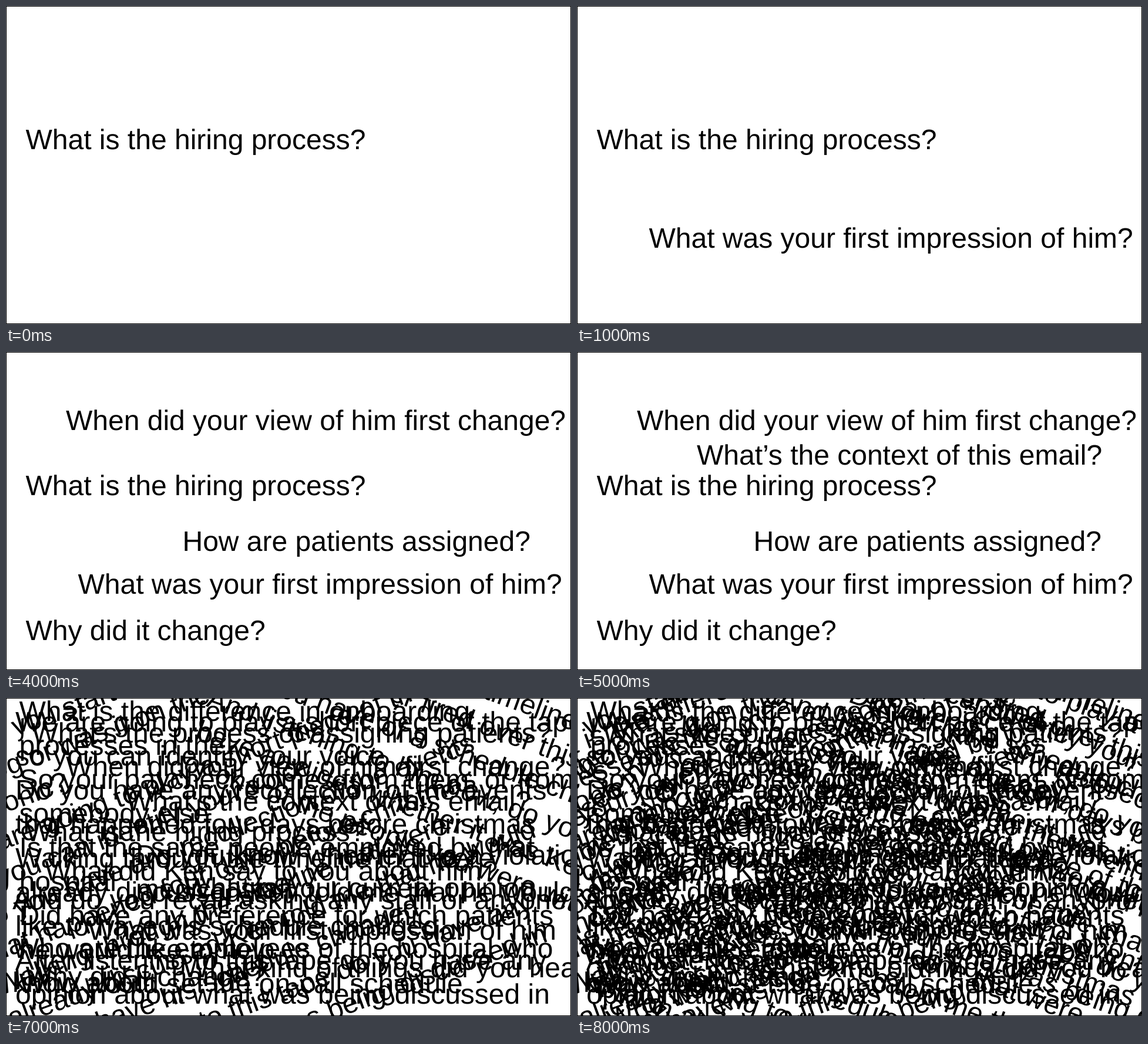
These frames come from a looping animation (962 by 542 pixels, 10000 ms). An HTML page:

```html
<!DOCTYPE html>
<html lang="en">
<head>
<meta charset="utf-8">
<title>Overlapping questions</title>
<style>
  html, body { margin: 0; width: 100%; height: 100%; overflow: hidden; background: #fff; }
  svg { display: block; }
  text { font: 48px "Liberation Sans", Arial, sans-serif; text-rendering: geometricPrecision; }
</style>
</head>
<body>
<svg id="stage" width="962" height="542" viewBox="0 0 962 542">
  <rect x=".5" y=".5" width="961" height="541" fill="none" stroke="#000"/>
</svg>
<script>
const LOOP = 10000, LINE = 58;
const stage = document.getElementById('stage');
const blocks = [];

function make(tag, attrs, parent) {
  const el = document.createElementNS('http://www.w3.org/2000/svg', tag);
  for (const key in attrs) el.setAttribute(key, attrs[key]);
  return parent.appendChild(el);
}

// A block of lines, first baseline at (x, y), shown from second `from` until second `to`.
function block(from, to, x, y, text, angle = 0) {
  const el = make('g', { transform: `translate(${x} ${y}) rotate(${angle})` }, stage);
  text.split('|').forEach((line, i) => {
    make('text', { y: i * LINE }, el).textContent = line;
  });
  blocks.push({ from, to, el });
}

const hiring = 'What is the difference in onboarding|processes in the|' +
  'So your paycheck comes from them, or from|somebody else|' +
  'Is that the same people employed by that|hospital|' +
  'Did have any preference for which patients|he would like to help|' +
  'Who would set the on-call schedule';

const tape = 'We are going to play a short piece of the tape|so you can identify your voice|' +
  'Do you have any recollection of the events|that happened four days before christmas|' +
  'Walking through the timeline that were|already discussed Ken told me that he would|' +
  'like to have his schedule changed|After listening to this tape do you have any|' +
  'opinion about what was being discussed in';

const start = 'And did you start|the blog or was it on the one|electronic?|';

const meeting = 'Walking through the timeline that were|So was he ever fired over this meeting|' +
  'Did you have of a schedule change|And listening to him now, do you|' +
  'have any idea whether it was Kenny did|or one of the people you were with';

// Single questions
block(0, 10, 33.5, 244, 'What is the hiring process?');
block(1, 6, 122.5, 412, 'What was your first impression of him?');
block(2, 10, 102, 133, 'When did your view of him first change?');
block(3, 10, 33.5, 491, 'Why did it change?');
block(4, 6, 300.5, 339, 'How are patients assigned?');
block(5, 10, 204, 192, 'What’s the context of this email?');

// Crowd of questions
block(6, 7, 0, 42, hiring);
block(7, 10, 22.5, 39, hiring);
block(6, 10, 43.5, 76, 'What’s the process of assigning patients?');
block(6, 10, 221, 284, 'Do you know whether it is a violation of|medical staff');
block(6, 7, 66, 311, 'What did he say to you about him?');
block(7, 10, 66, 311, 'What did Ken say to you about him?');
block(6, 10, 303, 340, 'What is your current opinion');
block(6, 10, 11, 360, 'And do you recall asking any staff or anyone');
block(6, 10, 139.5, 412, 'What was your first impression of him');
block(6, 10, 11, 443, 'Who are the employees of the hospital who|know about');
block(6, 10, 301, 476, 'What kind of things did you hear');

// Tilted layers
block(7, 10, 16, 57, tape);
block(7, 10, -149, 126, start + tape, -20);
block(7, 10, 399, -150, meeting, 20);
block(8, 10, 500, -103, tape, 20);
block(8, 10, 170, 60, tape, 20);
block(8, 10, -130, 250, hiring, -38);
block(8, 10, -100, 130, hiring, -20);

function draw(now) {
  const t = now % LOOP / 1000;
  for (const { from, to, el } of blocks) {
    el.style.display = t >= from && t < to ? '' : 'none';
  }
  requestAnimationFrame(draw);
}
draw(0);
</script>
</body>
</html>
```
